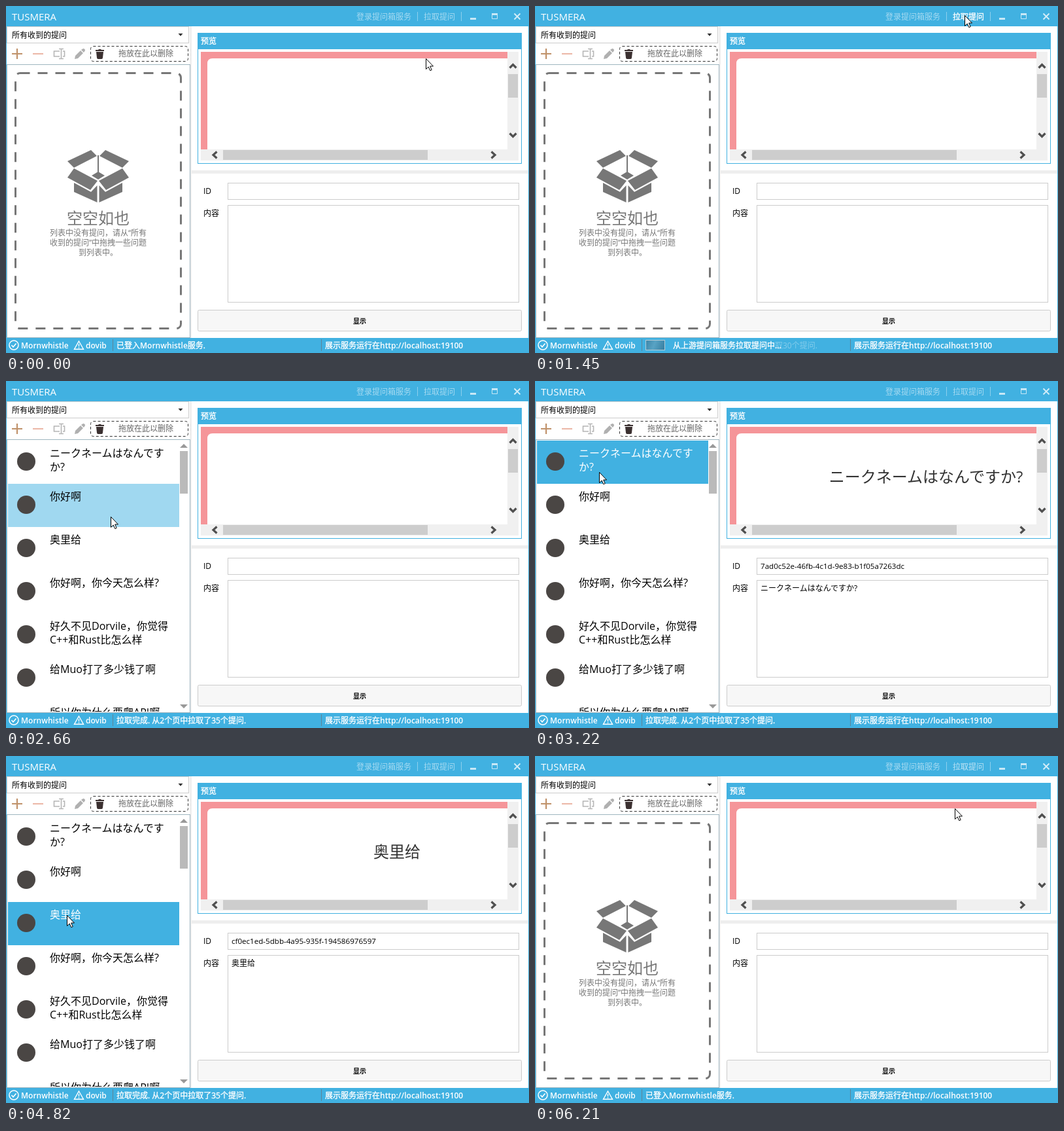
An HTML page that plays this animation: 800 px wide and 530 px high, repeating every 6.24 s.

```html
<!DOCTYPE html>
<html lang="zh-CN">
<head>
<meta charset="utf-8">
<style>
html, body { margin: 0; width: 100%; height: 100%; overflow: hidden; background: #fff; }
svg { display: block; }
text { font-family: "Open Sans", "Noto Sans CJK SC", "Noto Sans CJK", sans-serif; white-space: pre; }
.b { font-weight: 600; stroke: none; }
.firm { stroke: #fff; stroke-width: .35px; }
.id { font-size: 11.6px; }
</style>
</head>
<body>
<svg id="stage" width="800" height="530" viewBox="0 0 800 530">
  <g id="base"></g><g id="now"></g><g id="start"></g>
</svg>
<script>
const LOOP = 6240, BLUE = '#41b1e1', GRAY = '#777';
const byId = id => document.getElementById(id);

const rect = (x, y, w, h, fill, extra = '') =>
  `<rect x="${x}" y="${y}" width="${w}" height="${h}" fill="${fill}" ${extra}/>`;
const frame = (x, y, w, h, stroke, fill = '#fff', extra = '') =>
  rect(x + .5, y + .5, w - 1, h - 1, fill, `stroke="${stroke}" ${extra}`);
const shape = (d, fill, extra = '') => `<path d="${d}" fill="${fill}" ${extra}/>`;
const line = (d, stroke, width = 1, extra = '') =>
  shape(d, 'none', `stroke="${stroke}" stroke-width="${width}" ${extra}`);
// Text is placed by its left edge (or anchor) and vertical centre.
const text = (x, cy, size, str, fill = '#000', extra = '') =>
  `<text x="${x}" y="${cy + size * .37}" font-size="${size}" fill="${fill}" ${extra}>${str}</text>`;
const centred = (x, cy, size, str, fill, extra = '') =>
  text(x, cy, size, str, fill, 'text-anchor="middle" ' + extra);
const firm = (x, cy, str) => text(x, cy, 12, str, '#fff', 'class="firm"');
const bold = str => `<tspan class="b">${str}</tspan>`;

const rows = [
  { lines: ['ニークネームはなんです', 'か?'], id: '7ad0c52e-46fb-4c1d-9e83-b1f05a7263dc' },
  { lines: ['你好啊'], id: 'bff3fa8c-089e-41b2-b5d2-0d59a09f3c7b' },
  { lines: ['奥里给'], id: 'cf0ec1ed-5dbb-4a95-935f-194586976597' },
  { lines: ['你好啊，你今天怎么样?'] },
  { lines: ['好久不见Dorvile，你觉得', 'C++和Rust比怎么样'] },
  { lines: ['给Muo打了多少钱了啊'] },
  { lines: ['所以你为什么要爬API啊'] }
];
const ROW_TOP = 91, ROW_H = 66;

function titleBar() {
  const dim = '#a6daf1';
  return rect(0, 0, 800, 31, BLUE) + text(9, 16.5, 15, 'TUSMERA', '#fff')
    + text(536, 16.5, 12, '登录提问箱服务', dim)
    + line('M629.5 9V23M696.5 9V23', '#8dd0ed')
    + rect(710, 18, 9, 3, '#c8e8f6')
    + line('M743.5 12V19.5H751.5V12', '#c8e8f6') + rect(743, 11, 9, 3, '#c8e8f6')
    + line('M777.5 11.5L786.5 20.5M786.5 11.5L777.5 20.5', '#d4edf8', 1.8);
}

function toolbar() {
  return frame(1, 31, 279, 26, '#ccc') + text(9, 44.5, 12, '所有收到的提问')
    + shape('M263.5 42H270.5L267 46Z', '#333')
    + line('M9 73H25M17 65V81', '#c0926a', 2.2) + line('M41 73H57', '#ecb9a9', 2.2)
    + line('M82 69H73.5V77H82M87 69H89.5V77H87M81 65.5H88M84.5 65.5V80.5M81 80.5H88', '#b5b5b5', 1.6)
    + shape('M105 81L106 76 114 68 118 72 110 80ZM115 67L118 65Q121 65 121 68L119 71Z', '#b0b0b0')
    + rect(129.5, 61.5, 149, 23, '#fff', 'rx="4" stroke="#333" stroke-dasharray="4 3"')
    + shape('M137 67H141L142 66H145L146 67H150V69H137ZM138 70H149L148 79Q148 81 146 81H141Q139 81 139 79Z', '#3b3030')
    + text(172, 73, 12, '拖放在此以删除', '#666');
}

function preview() {
  const chevrons = 'M770.5 94.5L775.5 89.5 780.5 94.5M770.5 194.5L775.5 199.5 780.5 194.5'
    + 'M322.5 222.5L317 227.5 322.5 232.5M742.5 222.5L748 227.5 742.5 232.5';
  return frame(293, 41, 496, 200, BLUE) + rect(293, 41, 496, 25, BLUE) + firm(298, 54, '预览')
    + rect(298, 70, 486, 166, '#f0f0f0') + rect(298, 70, 469, 149, '#f59599')
    + shape('M308 219V88Q308 80 316 80H767V219Z', '#fff')
    + rect(768, 104, 15, 36, '#cdcdcd') + rect(332, 220, 313, 15, '#cdcdcd')
    + line(chevrons, '#505050', 3.2);
}

function chrome() {
  return titleBar() + toolbar() + rect(281, 31, 3, 476, '#efefef') + preview()
    + rect(284, 251, 515, 5, '#eee')
    + text(302, 283, 12, 'ID') + text(302, 317, 12, '内容')
    + frame(293, 464, 496, 33, '#ccc', '#f7f7f7', 'rx="2"')
    + centred(541, 481, 10, '显示', '#000', 'font-weight="700"')
    + line('M.5 0V530M799.5 0V530', BLUE)
    + rect(0, 507, 800, 23, BLUE)
    + '<circle cx="12" cy="518" r="7" fill="none" stroke="#fff" stroke-width="1.5"/>'
    + line('M8.5 518L11 520.7 15.5 515.5', '#fff', 1.6)
    + line('M111.5 512L118.5 524.2H104.5ZM111.5 516V520M111.5 521.2V522.8', '#fff', 1.4)
    + firm(23, 518.5, bold('Mornwhistle')) + firm(122, 518.5, bold('dovib'))
    + line('M163.5 509V527M482.5 509V527', '#5d8597')
    + firm(488, 518.5, '展示服务运行在' + bold('http://localhost:19100'));
}

function emptyList() {
  const half = shape('M94 237L130 220 139 229 104 247ZM104 248L140 267 129 281 94 262Z'
    + 'M104 270L130 284 139.5 274V300L104 284Z', GRAY);
  return rect(14.5, 102.5, 253, 390, 'none', `rx="7" stroke="${GRAY}" stroke-width="3" stroke-dasharray="15 12"`)
    + half + `<g transform="matrix(-1 0 0 1 282 0)">${half}</g>`
    + line('M141 228V256', GRAY, 2) + shape('M131 259L141 253 151 259 141 265Z', GRAY)
    + centred(141, 324, 24, '空空如也', GRAY)
    + ['列表中没有提问，请从“所有', '收到的提问”中拖拽一些问题', '到列表中。']
      .map((s, i) => centred(141, 347 + i * 15, 12, s, GRAY)).join('');
}

function questionList(hover, selected) {
  const items = rows.map(({ lines }, i) => {
    const y = ROW_TOP + i * ROW_H, on = i === selected;
    const back = on ? BLUE : i === hover ? '#a0d8f0' : '#fff';
    return rect(3, y, 262, ROW_H, back) + `<circle cx="31" cy="${y + 32}" r="14" fill="#4a4644"/>`
      + lines.map((s, k) => text(67, y + 19 + k * 21, 16, s, on ? '#fff' : '#000')).join('');
  }).join('');
  return `<svg x="2" y="91" width="278" height="414" viewBox="2 91 278 414">${items}
    ${rect(266, 107, 12, 65, '#bababa')}${shape('M266 102H278L272 96ZM266 494H278L272 500Z', '#999')}</svg>`;
}

function status(t) {
  if (t < 1060) return firm(169, 518.5, `已登入${bold('Mornwhistle')}服务.`);
  if (t >= 1930) return firm(169, 518.5, '拉取完成. 从2个页中拉取了35个提问.');
  const shift = steps(t, 1180, 1730, 11) * 120;
  const count = Math.min(35, 10 + 10 * Math.floor((t - 1180) / 130));
  return `<linearGradient id="sheen" gradientUnits="userSpaceOnUse" spreadMethod="reflect"
      x1="${160 + shift}" y1="511" x2="${186 + shift}" y2="521">
      <stop stop-color="#23688b"/><stop offset="1" stop-color="#58a3c4"/></linearGradient>`
    + frame(169, 510, 30, 16, '#b5cbd5', 'url(#sheen)')
    + (t >= 1180 && t < 1730 ? text(367, 518.5, 12, `取${count}个提问.`, '#fff', 'opacity=".35"') : '')
    + firm(211, 518.5, '从上游提问箱服务拉取提问中...');
}

// Progress 0..1 in n equal jumps, the first at t0 and the last at t1.
function steps(t, t0, t1, n) {
  const k = Math.floor((t - t0) * (n - 1) / (t1 - t0) + 1e-6) + 1;
  return Math.max(0, Math.min(n, k)) / n;
}

// Each move: begin, end, jumps, then stops as [progress, x, y].
const moves = [
  [530, 885, 7, [0, 642, 80], [1, 657, 14]],
  [2300, 2840, 13, [0, 657, 14], [4 / 13, 440, 150], [7 / 13, 215, 246], [9 / 13, 160, 207], [1, 98, 139]],
  [3440, 3670, 6, [0, 98, 139], [1, 95, 179]],
  [4030, 4330, 6, [0, 95, 179], [1, 93, 243]]
];
const clicks = [[1000, 1120], [3120, 3220], [3910, 3990], [4440, 4580]];

function pointer(t) {
  const [t0, t1, n, ...stops] = moves.filter(m => t >= m[0]).pop() || moves[0];
  const p = steps(t, t0, t1, n);
  const i = Math.max(1, stops.findIndex(s => s[0] >= p - 1e-6));
  const [p0, x0, y0] = stops[i - 1], [p1, x1, y1] = stops[i];
  const k = (p - p0) / (p1 - p0);
  return [Math.round(x0 + (x1 - x0) * k), Math.round(y0 + (y1 - y0) * k)];
}

function scene(t) {
  const [x, y] = pointer(t);
  const selected = t < 3120 ? -1 : t < 3910 ? 0 : t < 4440 ? 1 : 2;
  const hover = x > 2 && x < 265 && y >= ROW_TOP ? Math.floor((y - ROW_TOP) / ROW_H) : -1;
  const overMenu = x >= 636 && x < 692 && y < 30;
  const item = rows[selected], content = item ? item.lines.join('') : '';
  return (overMenu ? firm(639, 16.5, '拉取提问') : text(639, 16.5, 12, '拉取提问', '#a6daf1'))
    + frame(1, 89, 281, 418, '#9fb6c0')
    + (t < 1930 ? emptyList() : questionList(hover, selected))
    + rect(166, 508, 314, 22, BLUE) + status(t)
    + rect(440, 120, 310, 60, '#fff') + centred(598, 146, 24, content, '#333')
    + frame(339, 270, 446, 26, '#ccc') + text(345, 283, 12, item ? item.id : '', '#000', 'class="id"')
    + frame(339, 304, 446, 149, '#ccc') + text(345, 317, 12, content)
    + (clicks.some(([a, b]) => t >= a && t < b)
      ? `<circle cx="${x}" cy="${y}" r="12" fill="#ffd72e" opacity=".65"/>` : '')
    + shape('M.5 .5V16.5L4.2 13 6.8 18.7 9.2 17.6 6.7 12H11.5Z', '#fff',
      `stroke="#000" transform="translate(${x} ${y})"`);
}

byId('base').innerHTML = chrome();
byId('start').innerHTML = scene(0);
let shown = '';
function render(now) {
  const t = now % LOOP, markup = scene(t);
  if (markup !== shown) byId('now').innerHTML = shown = markup;
  byId('start').setAttribute('opacity', steps(t, 5930, 6210, 5));
  requestAnimationFrame(() => render(performance.now()));
}
render(0);
</script>
</body>
</html>
```
